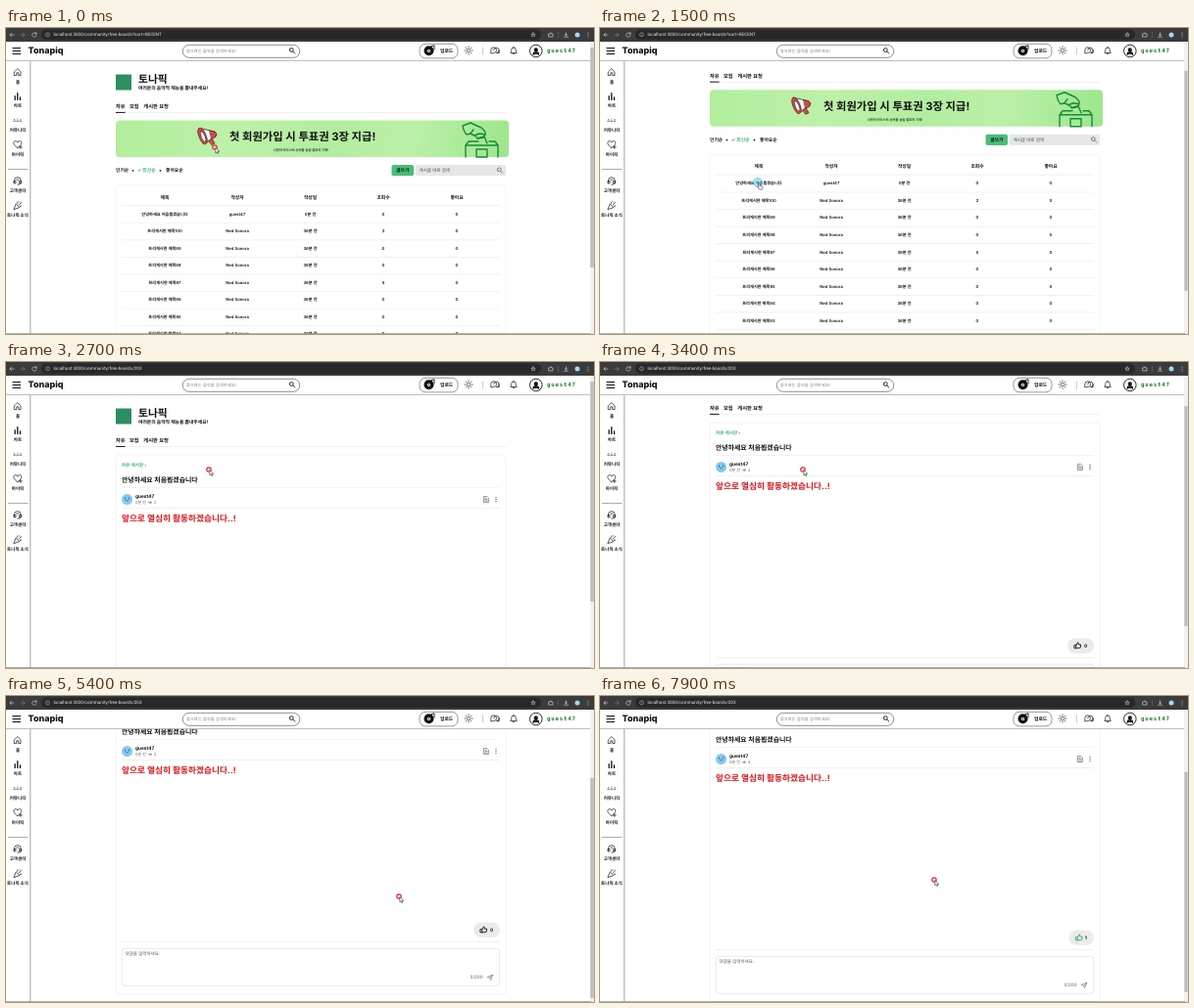
Write an HTML page with a canvas that moves like this. It is 600 px wide and 313 px high and loops after 8000 ms.

```html
<!DOCTYPE html>
<html lang="ko">
<head>
<meta charset="utf-8">
<title>Community board</title>
<style>
html, body { margin: 0; width: 100%; height: 100%; overflow: hidden; background: #fff; }
canvas { display: block; width: 600px; height: 313px; }
</style>
</head>
<body>
<canvas id="stage"></canvas>
<script>
const stage = document.getElementById('stage');
const ctx = stage.getContext('2d');
const ratio = window.devicePixelRatio || 1;
stage.width = 600 * ratio;
stage.height = 313 * ratio;

const LOOP = 8000, GREEN = '#2fb268', INK = '#111', GRAY = '#666', RULE = '#ececec';
const SANS = 'Inter, "Noto Sans CJK KR", "Noto Sans CJK", sans-serif';
const BRAND = 'Tonapiq', BRAND_KO = '토나픽', USER = 'guest47', AUTHOR = 'Ned Sonora';

// Keys are [time, ...values]; values ease between neighbouring keys.
const SCROLL = [[0, 0], [300, 0], [650, 31.25], [1700, 31.25], [1700, 0], [2750, 0], [3100, 31.25],
  [3350, 31.25], [3700, 62.5], [4050, 62.5], [4400, 84], [6950, 84], [6950, 76], [LOOP, 76]];
const POINTER = [[0, 213, 122], [100, 213, 122], [1250, 161, 158], [1850, 161, 158], [2650, 207, 110],
  [3700, 207, 110], [4000, 208, 107], [4550, 208, 107], [5400, 401, 205], [5750, 488, 240],
  [6200, 488, 240], [6700, 467, 222], [7200, 457, 203], [7900, 341, 188], [LOOP, 340, 188]];

function track(keys, t) {
  const i = keys.findIndex(k => k[0] > t);
  const a = keys[i - 1], b = keys[i];
  const p = (t - a[0]) / (b[0] - a[0]), e = p * p * (3 - 2 * p);
  return a.slice(1).map((v, n) => v + (b[n + 1] - v) * e);
}

function text(s, x, y, size, { color = INK, weight = 400, align = 'left', font = SANS, gap = 0 } = {}) {
  ctx.font = `${weight} ${size}px ${font}`;
  ctx.textRendering = 'geometricPrecision';
  ctx.letterSpacing = gap + 'px';
  ctx.textAlign = align;
  ctx.textBaseline = 'middle';
  ctx.fillStyle = color;
  ctx.fillText(s, x, y);
}
const bold = (s, x, y, size, color, align) => text(s, x, y, size, { color, align, weight: 700 });

function box(x, y, w, h, { fill, stroke, r = 0, lw = .6 } = {}) {
  ctx.beginPath();
  ctx.roundRect(x, y, w, h, r);
  if (fill) { ctx.fillStyle = fill; ctx.fill(); }
  if (stroke) { ctx.strokeStyle = stroke; ctx.lineWidth = lw; ctx.stroke(); }
}
const disc = (x, y, r, fill, stroke, lw) => box(x - r, y - r, 2 * r, 2 * r, { fill, stroke, r, lw });
const rule = (x, y, w, color = RULE) => box(x, y, w, .7, { fill: color });

function icon(d, x, y, { stroke = INK, fill, lw = .7 } = {}) {
  const path = new Path2D(d);
  ctx.save();
  ctx.translate(x, y);
  ctx.lineWidth = lw;
  ctx.lineCap = ctx.lineJoin = 'round';
  if (fill) { ctx.fillStyle = fill; ctx.fill(path); }
  if (stroke) { ctx.strokeStyle = stroke; ctx.stroke(path); }
  ctx.restore();
}

const ICON = {
  search: 'M-2.6-.7a1.9 1.9 0 1 0 3.8 0a1.9 1.9 0 1 0-3.8 0M.8.8L2.8 2.8',
  home: 'M-3.2-.3L0-3.4L3.2-.3V3.6H1V.8H-1V3.6H-3.2Z',
  chart: 'M-2.6 3.4V-.4M0 3.4V-3.4M2.7 3.4V1',
  people: 'M-4 1.2h1.6M-.9 1.2H.9M2.4 1.2H4M-3.2-.6v.1M0-1v.1M3.2-.6v.1',
  heart: 'M0 3.6C-6 0-4-4-1.6-3.4Q-.4-3 0-1.9Q.4-3 1.6-3.4C4-4 6 0 0 3.6M3 1.4v3M1.5 2.9h3',
  headset: 'M-3.4 1.6V-.4a3.4 3.4 0 0 1 6.8 0V1.6M-3.4 0h1.6v2.4h-1.6zM3.4 0H1.8v2.4h1.6zM3.4 2Q3 4 0 3.8M-1-1.4h2',
  party: 'M-3.8 3.8L-1.6-1.6L1.8 1.8ZM-.4-2.2l.6-1.6M1.4-.4L3.8-3M2.6.8l1.4-.2M2-3.6v.1',
  chat: 'M-4.2 2.8V-.2a2.9 2.9 0 1 1 2.9 3ZM-1.3-.1a2.7 2.7 0 1 1 2.7 2.9H4.2V-.1',
  bell: 'M-3 2.2Q-2.2 1-2.2-.8a2.2 2.2 0 0 1 4.4 0Q2.2 1 3 2.2ZM-.8 3.4H.8M0-3V-3.8',
  thumb: 'M-3.2-.3h1.5v3.1h-1.5zM-1.7-.2L0-3.2Q1.2-3 .6-.9H3Q3.4-.6 2.6 2.4Q2.3 2.8-1.7 2.8',
  send: 'M-2.6-.4L2.8-2.6L.8 2.8L-.4.6ZM-.4.6L2.8-2.6',
  file: 'M-2.2-3H.8L2.4-1.4V3H-2.2ZM-1.2.2H1.2M-1.2 1.5H1.2M-1.2-1.2H0',
  eye: 'M-1.7 0Q0-2.2 1.7 0Q0 2.2-1.7 0M-.4 0a.4.4 0 1 0 .8 0a.4.4 0 1 0-.8 0',
  user: 'M-1.3-1.6a1.3 1.3 0 1 0 2.6 0a1.3 1.3 0 1 0-2.6 0M-2.6 3Q-2.4.6 0 .6T2.6 3',
  reload: 'M1.9-1.1A2.2 2.2 0 1 0 2.1.8M2.1-2.4V-.9H.6',
  stop: 'M-1.7-1.7L1.7 1.7M1.7-1.7L-1.7 1.7',
  star: 'M0-2.2L.6-.7L2.2-.6L1-.1L1.4 1.8L0 .9L-1.4 1.8L-1-.1L-2.2-.6L-.6-.7Z',
  arrow: 'M0 0V5L1.2 3.9L2.1 5.8L3 5.4L2.1 3.6H3.6Z',
  hand: 'M0 0Q.9-.6 1.2.2V2.4L3.8 3Q4.4 3.3 4.2 4.4L3.6 6.4H.9L-1 3.8Q-.6 3 0 3.6Z'
};

function browserBar(t, url) {
  box(0, 0, 600, 14, { fill: '#3b3b3b' });
  box(36, 1.5, 510, 10.5, { fill: '#282828', r: 5 });
  const pale = { stroke: '#ddd', lw: .6 };
  icon('M2 0H-2M-.3-1.8L-2 0L-.3 1.8', 6, 7, pale);
  icon('M-2 0H2M.3-1.8L2 0L.3 1.8', 17, 7, { stroke: '#888', lw: .6 });
  icon(t > 6250 && t < 6900 ? ICON.stop : ICON.reload, 29, 7, pale);
  disc(42.5, 6.8, 2, null, '#ccc', .5);
  rule(42.2, 6.5, .6, '#ccc');
  text(url, 48.5, 7, 4.6, { color: '#e8e8e8', font: 'Roboto, sans-serif' });
  icon(ICON.star, 538, 7, { stroke: '#ddd', lw: .5 });
  icon('M-2-1h1.2v-.8h1.4V-1H2V2H-2Z', 556, 7, pale);
  box(563, 4, .5, 6, { fill: '#777' });
  icon('M0-2.2V.8M-1.3-.4L0 .8L1.3-.4M-2 2.2H2', 571.5, 7, pale);
  disc(583, 7, 2.5, '#a9d5ef');
  for (const dy of [-2, 0, 2]) disc(594, 7 + dy, .5, '#ddd');
}

function header(loggedIn) {
  box(0, 14, 600, 19.5, { fill: '#fff' });
  rule(0, 33, 597, '#aaa');
  for (const y of [20, 23, 26]) box(6.5, y, 8.5, 1, { fill: INK });
  text(BRAND, 22.5, 23.3, 9, { weight: 800 });

  const shift = loggedIn ? 0 : 16.3;
  box(180.3 + shift, 17.3, 119.5, 13, { stroke: '#444', r: 6.5 });
  text('찾으려는 음악을 검색하세요!', 184 + shift, 23.5, 4.1, { color: '#777', gap: .15 });
  icon(ICON.search, 292 + shift, 23.2, { lw: .9 });

  const up = 422 + 2 * shift;
  box(up, 16.3, 39, 14.6, { stroke: '#555', r: 6 });
  disc(up + 9.5, 23.3, 5, INK);
  disc(up + 9.5, 23.3, 1.6, '#fff');
  disc(up + 9.5, 23.3, .7, INK);
  icon('M-1 3V-1.5L2-2.2V2', up + 13, 20, { lw: .9 });
  bold('업로드', up + 21, 23.5, 4.8);

  if (loggedIn) {
    disc(472, 23, 1.9, null, INK, .6);
    for (let a = 0; a < 8; a++) {
      const c = Math.cos(a * Math.PI / 4), s = Math.sin(a * Math.PI / 4);
      icon(`M${c * 3.2} ${s * 3.2}L${c * 4.2} ${s * 4.2}`, 472, 23, { lw: .6 });
    }
  }
  box(486 + shift, 19.5, .6, 8, { fill: '#aaa' });
  icon(ICON.chat, 499 + shift, 22.8);
  icon(ICON.bell, 518 + shift, 23);
  if (loggedIn) {
    disc(540.8, 23.5, 6.3, '#fff', INK, .9);
    icon(ICON.user, 540.8, 24, { fill: '#243a44', lw: 1.6 });
    text(USER, 552, 23.7, 5.8, { color: '#1f8030', weight: 700, font: '"DejaVu Sans Mono", monospace', gap: .75 });
  } else {
    disc(557.3, 23.5, 6.3, '#fff', '#333', .7);
    icon(ICON.user, 557.3, 23.5, { lw: .6 });
    bold('로그인', 568.5, 23.6, 4.9);
  }
}

function sidebar() {
  box(0, 33.7, 25, 280, { fill: '#fff' });
  box(24.4, 34, .9, 279, { fill: '#999' });
  const items = [['home', 45, '홈', 55.3], ['chart', 70, '차트', 80], ['people', 94, '커뮤니티', 104.7],
    ['heart', 119, '마이픽', 129.3], ['headset', 156.5, '고객센터', 167], ['party', 181.5, BRAND_KO + ' 소식', 191.5]];
  for (const [name, iy, label, ty] of items) {
    icon(ICON[name], 11.8, iy, { lw: name === 'chart' ? 1.3 : .7 });
    bold(label, 12, ty, 4.5, INK, 'center');
  }
  rule(2, 144.2, 20.5, '#888');
}

function pageTop() {
  box(112, 47.5, 16, 16, { fill: '#2c8f60' });
  bold(BRAND_KO, 135, 52.8, 10.8);
  bold('여러분의 음악적 재능을 뽐내주세요!', 135, 61.2, 4.8);
  bold('자유', 112, 80.3, 5.3);
  bold('모집', 126, 80.3, 5.3);
  bold('게시판 요청', 140.3, 80.3, 5.3);
  rule(112, 86.3, 398);
  box(112, 85.9, 9.6, 1, { fill: INK });
}

function banner() {
  const g = ctx.createLinearGradient(112, 94, 513, 132);
  [[0, '#b2ee9c'], [.3, '#bdf1a9'], [.55, '#b2ed9f'], [.75, '#bbf0a8'], [1, '#9de68c']].forEach(s => g.addColorStop(...s));
  box(112, 94.5, 401, 37.5, { fill: g, r: 4 });

  const edge = { stroke: '#433', lw: .8 };
  icon('M0 0L13 3Q16 5 14 8L5 14Z', 200, 103, { ...edge, fill: '#f2f2f2' });
  icon('M8 2L13 3Q16 5 14 8L10 10.5Z', 200, 103, { ...edge, fill: '#e5453a' });
  icon('M7 12L10 10L13 15L10 16.5Z', 200, 103, { ...edge, fill: '#e5453a' });
  icon('M-1-1Q2-3 5.5 5T6 15Q3 17-.5 9T-1-1Z', 198, 103.5, { ...edge, fill: '#e5453a' });
  icon('M0 0Q2 0 4 5T4 11Q2 11 .2 6T0 0Z', 199, 105.5, { ...edge, fill: '#fff' });

  bold('첫 회원가입 시 투표권 3장 지급!', 228, 112, 11.3);
  bold('나만의 아티스트 순위를 높일 절호의 기회!', 301, 125.3, 3.3, '#243', 'center');

  const line = { stroke: '#168a3c', lw: 1.4 };
  icon('M0-1L8-4L19 1Q24 5 23 8L17 7L12 9L8 7L4 8Q1 5 0-1M12 9L16 12L21 11L23 8M8 7L11 3', 466, 101, line);
  icon('M15 12L22 10L25 17M3 31V19H36V31M3 19L6 15H16M27 15H33L36 19', 466, 101, line);
  icon('M14 23H25V31H14Z', 466, 101, line);
}

function listPage() {
  pageTop();
  banner();
  bold('인기순', 112, 145.8, 4.8);
  disc(129.5, 145.8, .9, INK);
  bold('✓ 최신순', 134, 145.8, 4.8, GREEN);
  disc(157.5, 145.8, .9, INK);
  bold('좋아요순', 163, 145.8, 4.8);
  box(393.5, 140, 22.5, 11.3, { fill: '#49bd79', r: 2 });
  bold('글쓰기', 404.8, 145.8, 4.8, INK, 'center');
  box(418, 140, 92, 11.3, { fill: '#e5e7e9', r: 2 });
  text('게시글 바로 검색', 421.5, 145.8, 4.5, { color: '#444' });
  icon(ICON.search, 504, 145.6, { stroke: '#555' });

  box(112, 161, 398, 216, { stroke: '#ececec', r: 3 });
  const columns = [162, 236, 310.5, 385, 460];
  ['제목', '작성자', '작성일', '조회수', '좋아요'].forEach((s, i) => bold(s, columns[i], 173.3, 4.8, INK, 'center'));
  rule(118, 181, 386);
  const views = { 100: 2, 97: 5 };
  for (let i = 0; i < 10; i++) {
    const n = 101 - i, y = 190.3 + i * 17.55;
    const cells = i ? ['프리게시판 제목' + n, AUTHOR, '36분 전', views[n] || 0, 0]
      : ['안녕하세요 처음뵙겠습니다', USER, '0분 전', 0, 0];
    cells.forEach((s, c) => text(s, columns[c], y, 4.2, { align: 'center', weight: 600 }));
    rule(118, y + 8.6, 386);
  }
}

function postPage({ loaded, views, liked }) {
  pageTop();
  box(112, 95, 398, 294, { stroke: '#e9e9e9', r: 4 });
  if (loaded) {
    bold('자유 게시판 ›', 118, 105.3, 4.6, GREEN);
    bold('안녕하세요 처음뵙겠습니다', 118, 121.2, 6.9);
    disc(123.6, 140.5, 5.5, '#83c9ee');
    icon('M-2-1v1M2-1v1M-.8 1.6Q0 2.2.8 1.6', 123.6, 140, { stroke: '#234' });
    bold(USER, 132, 137.7, 4.8);
    text('0분 전', 132, 143.7, 4, { color: GRAY });
    icon(ICON.eye, 147.3, 143.7, { stroke: GRAY, lw: .5 });
    text(views, 151, 143.7, 4, { color: GRAY });
    bold('앞으로 열심히 활동하겠습니다..!', 118, 160.8, 8.7, '#d8161a');
  } else {
    box(118.5, 137, 3.6, 3.6, { fill: '#9cc9a0', stroke: '#888', lw: .4 });
    bold('프', 123.2, 139, 4.6);
    bold('로필', 119, 144.3, 4.6);
    text('NaN년 전', 132, 141.3, 4, { color: GRAY });
    icon(ICON.eye, 153, 141.3, { stroke: GRAY, lw: .5 });
    text('0', 157, 141.3, 4, { color: GRAY });
    bold('[object Object]', 118, 158.6, 5.1);
  }
  rule(118, 128.4, 386);
  rule(118, 149, 386);
  icon(ICON.file, 490, 140.5, { stroke: '#555', lw: .6 });
  for (const dy of [-2, 0, 2]) disc(500, 140.5 + dy, .6, '#333');

  const inset = liked ? 1.5 : 0;
  box(477 + inset, 315.5, 27 - inset, 15.5, { fill: '#ebebeb', r: 7.7 });
  icon(ICON.thumb, 487.5 + inset, 323, { stroke: liked ? GREEN : INK, lw: .9 });
  bold(liked ? '1' : '0', 495.7, 323.3, 4.8, INK, 'center');
  rule(118, 335, 386);
  box(118.3, 342.3, 385.4, 38, { stroke: '#d8d8d8', r: 3 });
  text('댓글을 입력하세요..', 121.5, 348, 4.5, { color: '#555' });
  text('0/200', 473.5, 371.8, 4.6, { color: '#555' });
  icon(ICON.send, 494, 371.8, { stroke: GRAY, lw: .6 });
}

function scrollbar(scroll) {
  box(596, 14, 4, 299, { fill: '#f1f1f1' });
  box(596.3, 20 + scroll * .76, 3.4, 225, { fill: '#bdbdbd' });
}

function pointer(t) {
  const [x, y] = track(POINTER, t);
  const hover = t > 1200 && t < 1750 || t > 5700 && t < 6250;
  const pressed = t > 1400 && t < 1650 || t > 5800 && t < 5980;
  if (pressed) disc(x, y, 4.5, 'rgba(90,205,235,.5)', 'rgba(70,190,225,.7)', .9);
  else disc(x, y, 2.2, 'rgba(255,255,255,.6)', '#e0262b', 1.2);
  icon(hover ? ICON.hand : ICON.arrow, x + .8, y + .8, { fill: '#fff', stroke: '#333', lw: .6 });
}

function draw() {
  const t = performance.now() % LOOP;
  const onList = t < 1700, reloading = t >= 6400 && t < 6950;
  const [scroll] = track(SCROLL, t);

  ctx.setTransform(ratio, 0, 0, ratio, 0, 0);
  box(0, 0, 600, 313, { fill: '#fff' });
  ctx.save();
  ctx.translate(0, -scroll);
  if (onList) listPage();
  else postPage({
    loaded: t >= 1900 && !reloading,
    views: t < 6400 ? 2 : 4,
    liked: t >= 5880 && !reloading
  });
  ctx.restore();

  sidebar();
  header(!reloading);
  scrollbar(scroll);
  rule(0, 312, 597, '#999');
  browserBar(t, 'localhost:3000/community/free-boards' + (onList ? '?sort=RECENT' : '/203'));
  pointer(t);
  requestAnimationFrame(draw);
}
draw();
</script>
</body>
</html>
```
